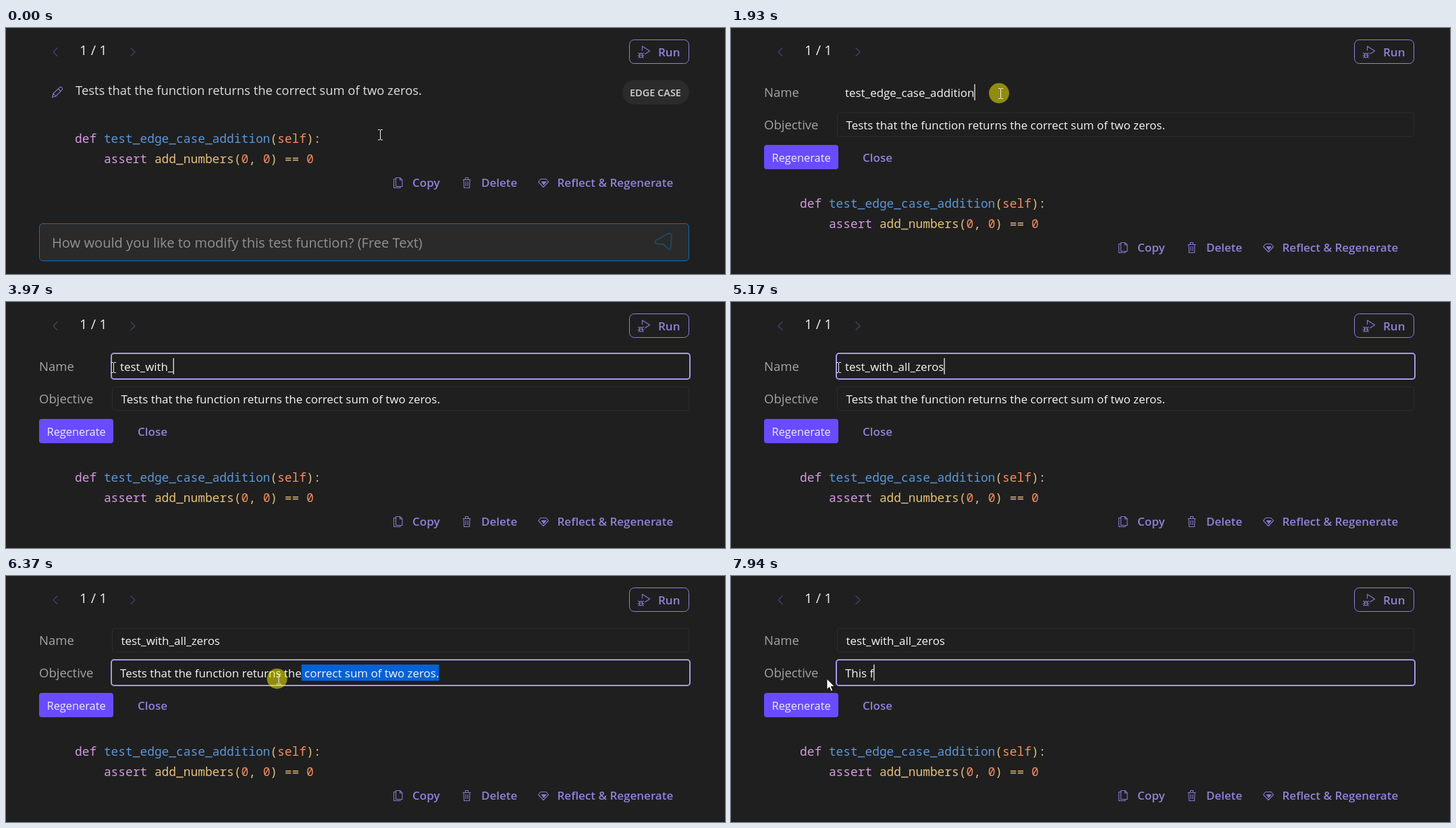
An HTML page for the animation above (8 s loop, 1065x364 px).

```html
<!DOCTYPE html>
<html lang="en">
<head>
<meta charset="utf-8">
<title>Edit a test</title>
<style>
  html, body { margin: 0; width: 100%; height: 100%; overflow: hidden; background: #1f1f1f; }
  svg { display: block; width: 100vw; height: 100vh; }
  text { font-family: "Open Sans", "Noto Sans", sans-serif; white-space: pre; }
  .link { font-size: 17px; font-weight: 600; fill: #9182da; }
  .label { font-size: 18.5px; fill: #a4a4a4; }
  .value { font-size: 16.95px; fill: #f6f6f6; }
  .code { font-family: "Noto Sans Mono", "DejaVu Sans Mono", monospace; font-size: 17.87px; font-weight: 500; fill: #e5c07b; }
  .key { fill: #d39be0; }
  .fn { fill: #5c96d6; }
  .num { fill: #f78f60; }
  .icon { fill: none; stroke: #8779d0; stroke-width: 1.1; stroke-linejoin: round; stroke-linecap: round; }
  .box { fill: none; }
  .sel { fill: #0561d6; }
  .caret { fill: #fff; }
</style>
</head>
<body>
<svg viewBox="0 0 1065 364">
  <path class="icon" style="stroke:#4b456c" d="M76 29.5L70 35.5L76 41.5M185 29.5L191 35.5L185 41.5"/>
  <text x="109" y="40" font-size="20" fill="#ececec">1 / 1</text>
  <rect x="923.5" y="17.5" width="88" height="35" rx="7" fill="none" stroke="#9080e4"/>
  <g class="icon">
    <path d="M942.5 33V27L953.5 34L946.5 38.5"/>
    <ellipse cx="940.5" cy="40.5" rx="2.3" ry="3.2"/>
    <path d="M938.5 40H942.5M938 38L936.5 37M943 38L944.5 37M938 41H936M943 41H945M938 43L937 44M943 43L944 44"/>
  </g>
  <text class="link" x="966" y="42">Run</text>

  <g id="summary">
    <path class="icon" d="M68.5 102.5L70 97L79.5 87.8Q81.5 86.8 83 88.3Q84.3 90 83 91.7L73.7 101ZM70 97L73.7 101M77.5 90L81 93.5"/>
    <text x="103" y="99" font-size="18.4" fill="#dedede">Tests that the function returns the correct sum of two zeros.</text>
    <rect x="913" y="77" width="99" height="36" rx="18" fill="#2b2b2b"/>
    <text x="924" y="101" font-size="14.5" font-weight="600" fill="#d4d4d4">EDGE CASE</text>
  </g>

  <g id="form">
    <text class="label" x="49" y="102">Name</text>
    <text class="label" x="49" y="150">Objective</text>
    <rect x="49" y="173" width="110" height="36" rx="4" fill="#6a4bff"/>
    <text x="60.5" y="198" font-size="16.4" fill="#f0eeff">Regenerate</text>
    <text class="link" x="195" y="198">Close</text>
    <g id="name"><rect class="box"/><rect class="sel" y="83" height="24"/><text class="value" y="102"></text><rect class="caret" y="83" width="1.2" height="24"/></g>
    <g id="goal"><rect class="box"/><rect class="sel" y="131" height="24"/><text class="value" y="150"></text><rect class="caret" y="131" width="1.2" height="24"/></g>
  </g>

  <g id="lower">
    <text class="code" x="102" y="170"><tspan class="key">def</tspan> <tspan class="fn">test_edge_case_addition</tspan>(<tspan class="num">self</tspan>):</text>
    <text class="code" x="102" y="200">    <tspan class="key">assert</tspan> add_numbers(<tspan class="num">0</tspan>, <tspan class="num">0</tspan>) == <tspan class="num">0</tspan></text>
    <g class="icon">
      <path d="M577.5 221.5H583.5L587 225V234.5H577.5ZM583.5 221.5V225H587M577 223.5H574.5V236.5H584V234.5"/>
      <path d="M677 224.5H688M680.5 224V221.5H684.5V224M678 224.5L678.5 236.5H686.5L687 224.5M681 227.5V233.5M684 227.5V233.5"/>
      <path d="M792 223.5H800L803.5 227.5L796 235.5L788.5 227.5Z"/>
      <path d="M793.5 227.5H800L796.5 232Z" fill="#8779d0"/>
    </g>
    <text class="link" x="602" y="235">Copy</text>
    <text class="link" x="704" y="235">Delete</text>
    <text class="link" x="816.5" y="235">Reflect &amp; Regenerate</text>
    <rect x="49.5" y="289.5" width="962" height="55" rx="5" fill="#2a2a2a" stroke="#0e70c0"/>
    <text x="68" y="325" font-size="20.1" fill="#929292">How would you like to modify this test function? (Free Text)</text>
    <path d="M962 314.5L980 304.5Q986 302 986 308L984.5 325Q983.5 330 980 326L974 320L964 319.5Q960 318 962 314.5Z" fill="none" stroke="#214a63" stroke-width="1.8"/>
  </g>

  <circle id="press" r="15" fill="#fffa00" fill-opacity=".5"/>
  <g id="cursor">
    <path id="beam" fill="none" stroke="#f0f0f0" d="M-3 -7.5H0M1 -7.5H4M.5 -7V7M-3 7.5H0M1 7.5H4"/>
    <path id="arrow" fill="#fff" stroke="#000" stroke-width=".8" d="M0 0V16L3.7 12.5L6.3 18.5L8.8 17.4L6.2 11.6H11.3Z"/>
    <path id="hand" fill="#fff" stroke="#000" stroke-width=".8" d="M-2 1.5Q0 -1 2 1.5V8L9 9.5Q11 10 11 12V16L9 22H-1L-6 14Q-6 11 -4 12L-2 14Z"/>
  </g>
</svg>
<script>
const LOOP = 8000, STEP = 40, KEY = 80;
const $ = id => document.getElementById(id);
const show = (el, on) => el.setAttribute("visibility", on ? "inherit" : "hidden");
const set = (el, attrs) => { for (const k in attrs) el.setAttribute(k, attrs[k]); };
const ease = u => u * u * (3 - 2 * u);

// Each move eases on from the previous end, bent towards "via" if given.
const moves = [
  { at: 0, dur: 1, to: [554, 158] },
  { at: 70, dur: 680, to: [80, 92], via: [-42, 100] },
  { at: 1150, dur: 560, to: [399, 97], via: [210, 135] },
  { at: 1930, dur: 440, to: [159, 97] },
  { at: 5630, dur: 440, to: [665, 153] },
  { at: 6170, dur: 400, to: [142, 152] }
];

function pointer(t, lag = 0) {
  const i = moves.findLastIndex(m => m.at <= t), m = moves[i];
  const from = i ? moves[i - 1].to : m.to;
  const u = Math.floor((t - m.at) / STEP) * STEP - lag;
  const k = ease(Math.min(1, Math.max(0, u / m.dur)));
  return [0, 1].map(d => {
    const mid = m.via ? m.via[d] : (from[d] + m.to[d]) / 2;
    return from[d] * (1 - k) ** 2 + 2 * mid * k * (1 - k) + m.to[d] * k * k;
  });
}

// Typing comes in bursts, one key every KEY ms.
const fields = [
  { el: $("name"), y: 77, focus: 1930, blur: 6180, caretOff: 5460,
    before: "test_edge_case_addition",
    bursts: { 2730: "test", 3250: "_", 3390: "w", 3530: "ith", 3970: "_",
              4120: "all", 4520: "_", 4770: "z", 4920: "eros" } },
  { el: $("goal"), y: 125, focus: 6180, blur: LOOP, caretOff: LOOP,
    before: "Tests that the function returns the correct sum of two zeros.",
    bursts: { 7380: "This ", 7870: "fu" } }
];
for (const f of fields) [f.box, f.sel, f.text, f.caret] = f.el.children;

const typedAt = (bursts, t) => Object.entries(bursts)
  .map(([at, s]) => s.slice(0, Math.max(0, Math.floor((t - at) / KEY) + 1))).join("");

// Width of the text left of the letter gap nearest to x.
function widthAt(text, x) {
  let best = 0;
  for (let i = 1; i <= text.textContent.length; i++) {
    const w = text.getSubStringLength(0, i);
    if (Math.abs(w - x) < Math.abs(best - x)) best = w;
  }
  return best;
}

function drawField(f, t, x, y) {
  const focused = t >= f.focus && t < f.blur;
  const typed = typedAt(f.bursts, t), value = typed || f.before;
  if (f.text.textContent !== value) f.text.textContent = value;
  const left = focused ? 169 : 170.5;
  set(f.text, { x: left });

  const hover = x > 157 && y > f.y && y < f.y + 36;
  if (focused) set(f.box, { x: 156, y: f.y - 1, width: 857, height: 38, rx: 4, "stroke-width": 2,
    stroke: t < f.focus + STEP ? "none" : "#a898ea" });
  else set(f.box, { x: 157.5, y: f.y + .5, width: 854, height: 35, rx: 3, "stroke-width": 1,
    stroke: hover ? "#d4d4d4" : "#2c2c2c" });

  const full = f.text.getComputedTextLength();
  const start = focused && !typed ? widthAt(f.text, pointer(t, 18)[0] - left) : full;
  const selected = start < full - 1;
  show(f.sel, selected);
  set(f.sel, { x: left + start, width: Math.max(0, full - start) });
  show(f.caret, focused && !selected && t < f.caretOff);
  set(f.caret, { x: left + full });
}

function shape(t, x, y) {
  if (t < 930) return x < 95 ? "hand" : "beam";
  if (t >= 6170) return t < 6770 ? "beam" : "arrow";
  const onLabel = x < 101 && y < 107;
  const onField = x > 157 && (y < 113 || y > 125);
  return onLabel || onField ? "beam" : "arrow";
}

function draw(t) {
  const [x, y] = pointer(t), open = t >= 930;
  show($("summary"), !open);
  show($("form"), open);
  set($("lower"), { transform: `translate(0 ${open ? 96 : 0})` });
  if (open) for (const f of fields) drawField(f, t, x, y);

  const kind = shape(t, x, y);
  for (const id of ["beam", "arrow", "hand"]) show($(id), id === kind);
  set($("cursor"), { transform: `translate(${x} ${y})` });
  const held = [[890, 930], [1930, 2370], [6180, 6770]].some(([a, b]) => t >= a && t < b);
  show($("press"), held);
  set($("press"), { cx: x - 2, cy: y - .5 });
}

const begin = performance.now();
function tick() {
  draw((performance.now() - begin) % LOOP);
  requestAnimationFrame(tick);
}
tick();
</script>
</body>
</html>
```
